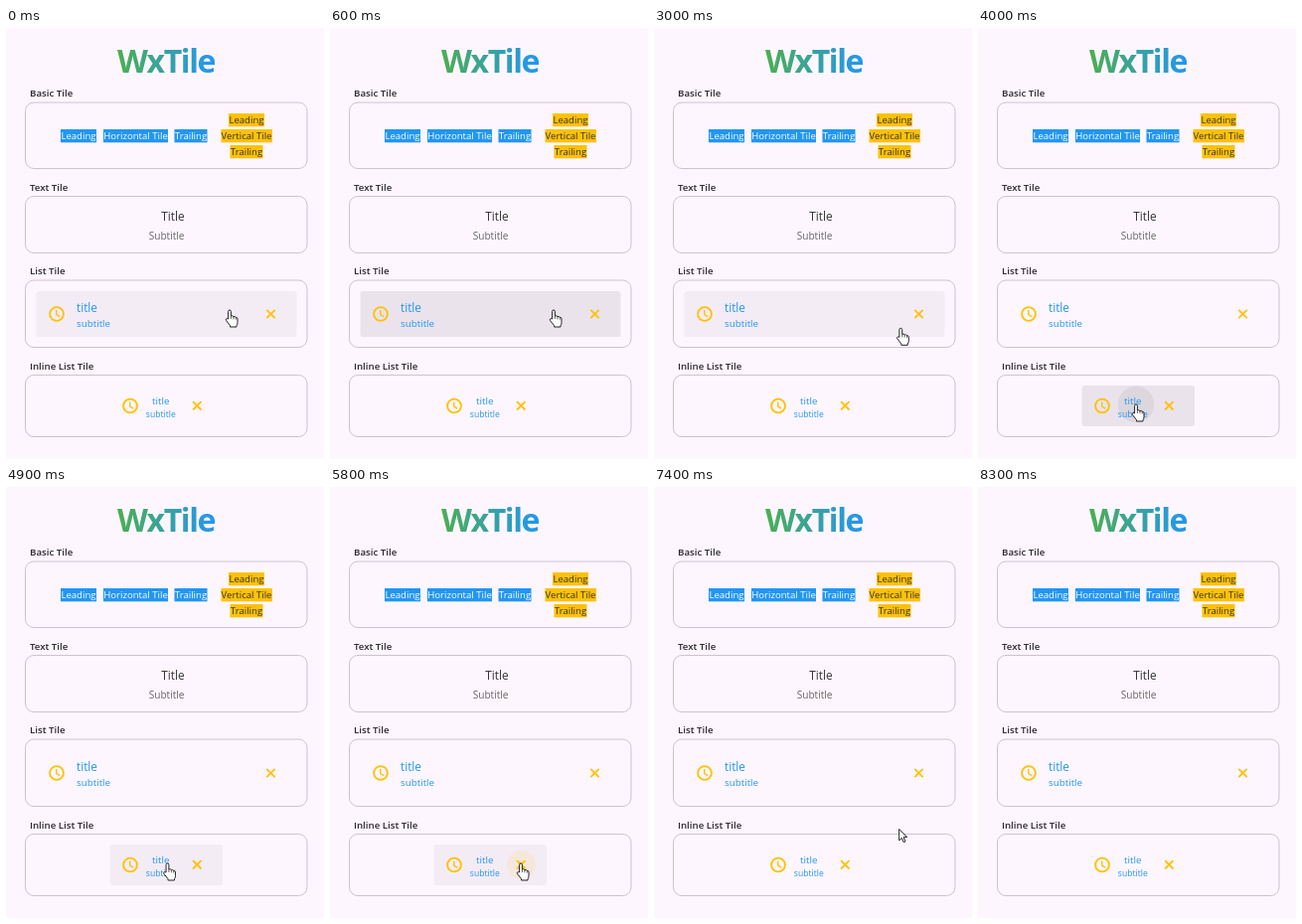
Recreate the animation shown at these times as an HTML page. Size 320 by 434 pixels, loop 9 s.

```html
<!DOCTYPE html>
<html lang="en">
<head>
<meta charset="utf-8">
<title>WxTile</title>
<style>
html, body { margin: 0; height: 100%; overflow: hidden; background: #fef6ff; }
svg { display: block; width: 100vw; height: 100vh; font: 9.6px "Open Sans", "Noto Sans", sans-serif; fill: #333; }
.logo { font-size: 32px; font-weight: 700; letter-spacing: -1.4px; fill: url(#brand); }
.label { font-size: 9.7px; font-weight: 600; fill: #2a272c; }
.frame { fill: none; stroke: #cbc4ce; }
.mid { text-anchor: middle; }
.blue { fill: #2196f3; }
.amber { fill: #ffc107; }
.white { fill: #fff; }
.big { font-size: 11.8px; }
.icon { fill: none; stroke: #ffc107; stroke-width: 1.9; }
.cursor { fill: #fff; stroke: #222; stroke-width: 1; stroke-linejoin: round; }
</style>
</head>
<body>
<svg viewBox="0 0 320 434">
  <defs>
    <linearGradient id="brand"><stop stop-color="#4caf50"/><stop offset="1" stop-color="#2196f3"/></linearGradient>
    <g id="clock" class="icon"><circle r="6.9"/><path d="M-.3-4V.6L3.2 2.7" stroke-width="1.4"/></g>
    <path id="close" class="icon" d="M-4.2-4.2 4.2 4.2M4.2-4.2-4.2 4.2"/>
  </defs>

  <text class="logo" x="112" y="45">WxTile</text>

  <g class="label">
    <text x="24" y="69">Basic Tile</text>
    <text x="24" y="164">Text Tile</text>
    <text x="24" y="248">List Tile</text>
    <text x="24" y="344">Inline List Tile</text>
  </g>
  <g class="frame">
    <rect x="19.5" y="75" width="283.5" height="66.5" rx="8.5"/>
    <rect x="19.5" y="169.5" width="283.5" height="57" rx="8.5"/>
    <rect x="19.5" y="254" width="283.5" height="67.5" rx="8.5"/>
    <rect x="19.5" y="349.5" width="283.5" height="62" rx="8.5"/>
  </g>

  <g class="blue">
    <rect x="55" y="102" width="36" height="13.3"/>
    <rect x="98" y="102" width="65" height="13.3"/>
    <rect x="169.5" y="102" width="33" height="13.3"/>
  </g>
  <g class="amber">
    <rect x="224" y="86" width="36" height="13.3"/>
    <rect x="216.5" y="102" width="51.5" height="13.3"/>
    <rect x="225.5" y="118" width="33" height="13.3"/>
  </g>
  <g class="mid white">
    <text x="73" y="112">Leading</text>
    <text x="130.5" y="112">Horizontal Tile</text>
    <text x="186" y="112">Trailing</text>
  </g>
  <g class="mid">
    <text x="242" y="96">Leading</text>
    <text x="242" y="112">Vertical Tile</text>
    <text x="242" y="128">Trailing</text>
  </g>

  <g text-anchor="end">
    <text class="big" x="179.5" y="194">Title</text>
    <text x="179.5" y="213" font-size="10.1" fill="#666">Subtitle</text>
  </g>

  <g id="ink"></g>

  <use href="#clock" x="51" y="288"/>
  <use href="#close" x="266.5" y="288"/>
  <g class="blue">
    <text class="big" x="71" y="286">title</text>
    <text x="71" y="301" font-size="9.8">subtitle</text>
  </g>

  <use href="#clock" x="125" y="380.5"/>
  <use href="#close" x="192.3" y="380.3"/>
  <g class="blue mid">
    <text x="155.8" y="378.5" font-size="9.8">title</text>
    <text x="155.8" y="392" font-size="8.6">subtitle</text>
  </g>

  <g id="hand" class="cursor">
    <path d="M-1.4 9V1.4a1.4 1.4 0 0 1 2.8 0V6q1.6-.8 2.5.6 1.5-.5 2.3.7 1.8-.2 1.8 1.6v3.6q0 2-1 3.3V17H.5V15.6L-3.6 10.4q-.6-1.6.8-1.8z"/>
    <path d="M1.4 6v3M3.9 6.7v2.6M6.2 7.4v2.2" stroke-width=".7"/>
  </g>
  <path id="arrow" class="cursor" d="M0 0V11.5L2.7 9l1.8 4.3 1.8-.8L4.5 8.2H8z"/>
</svg>

<script>
const LOOP = 9000;
const $ = id => document.getElementById(id);
const clamp = v => Math.max(0, Math.min(1, v));

// Pointer tip: [time, x, y]
const path = [
  [1050, 225, 284], [1400, 238, 320], [1800, 265, 288],
  [2750, 265, 288], [3750, 159, 379],
  [4750, 159, 379], [5500, 192, 379],
  [6250, 192, 379], [7200, 219, 361], [7400, 246.5, 344.5], [7800, 324, 318]
];

// Ink areas: bounds, corner radius, colour, hover opacity, press start and end
const areas = [
  { x: 30.5, y: 265, w: 262, h: 46, r: 3, color: "#000", hover: .04, press: [60, 1000] },
  { x: 104.5, y: 360, w: 113.5, h: 41, r: 3, color: "#000", hover: .04, press: [3880, 4650] },
  { x: 252, y: 273.5, w: 29, h: 29, r: 14.5, color: "#ffc107", hover: .1, press: [2060, 2540] },
  { x: 177.8, y: 365.8, w: 29, h: 29, r: 14.5, color: "#ffc107", hover: .1, press: [5770, 6140] }
];

$("ink").innerHTML = areas.map((a, i) => {
  const rect = `<rect x="${a.x}" y="${a.y}" width="${a.w}" height="${a.h}" rx="${a.r}" fill="${a.color}"/>`;
  return `<clipPath id="clip${i}">${rect}</clipPath><g>${rect}<circle clip-path="url(#clip${i})" fill="${a.color}"/></g>`;
}).join("");
areas.forEach((a, i) => {
  const group = $("ink").querySelectorAll("g")[i];
  a.fill = group.querySelector("rect");
  a.splash = group.querySelector("circle");
});

function pointerAt(t) {
  const next = path.findIndex(p => p[0] > t);
  if (next === 0) return path[0].slice(1);
  if (next < 0) return [400, 318];
  const [t0, x0, y0] = path[next - 1], [t1, x1, y1] = path[next];
  let k = (t - t0) / (t1 - t0);
  if (t < 6250) k = k * k * (3 - 2 * k);
  else if (t < 7200) k *= k;
  return [x0 + (x1 - x0) * k, y0 + (y1 - y0) * k];
}

function drawInk(a, t, x, y) {
  const inside = x >= a.x && x <= a.x + a.w && y >= a.y && y <= a.y + a.h;
  const [start, end] = a.press;
  const age = t - start;
  const held = clamp(age / 100) * clamp((end - t) / 300);
  a.fill.setAttribute("opacity", (inside ? a.hover : 0) + .04 * held);
  a.splash.setAttribute("cx", x);
  a.splash.setAttribute("cy", y);
  a.splash.setAttribute("r", age > 0 ? 18 * (age / 120) ** 1.5 : 0);
  a.splash.setAttribute("opacity", a.hover * 1.5 * clamp((450 - age) / 250));
  return inside;
}

function frame(now) {
  const t = now % LOOP;
  const [x, y] = pointerAt(t);
  const hovered = areas.map(a => drawInk(a, t, x, y)).some(Boolean);
  for (const id of ["hand", "arrow"]) {
    $(id).setAttribute("transform", `translate(${x} ${y})`);
    $(id).setAttribute("visibility", hovered === (id === "hand") ? "visible" : "hidden");
  }
  requestAnimationFrame(frame);
}
requestAnimationFrame(frame);
</script>
</body>
</html>
```
